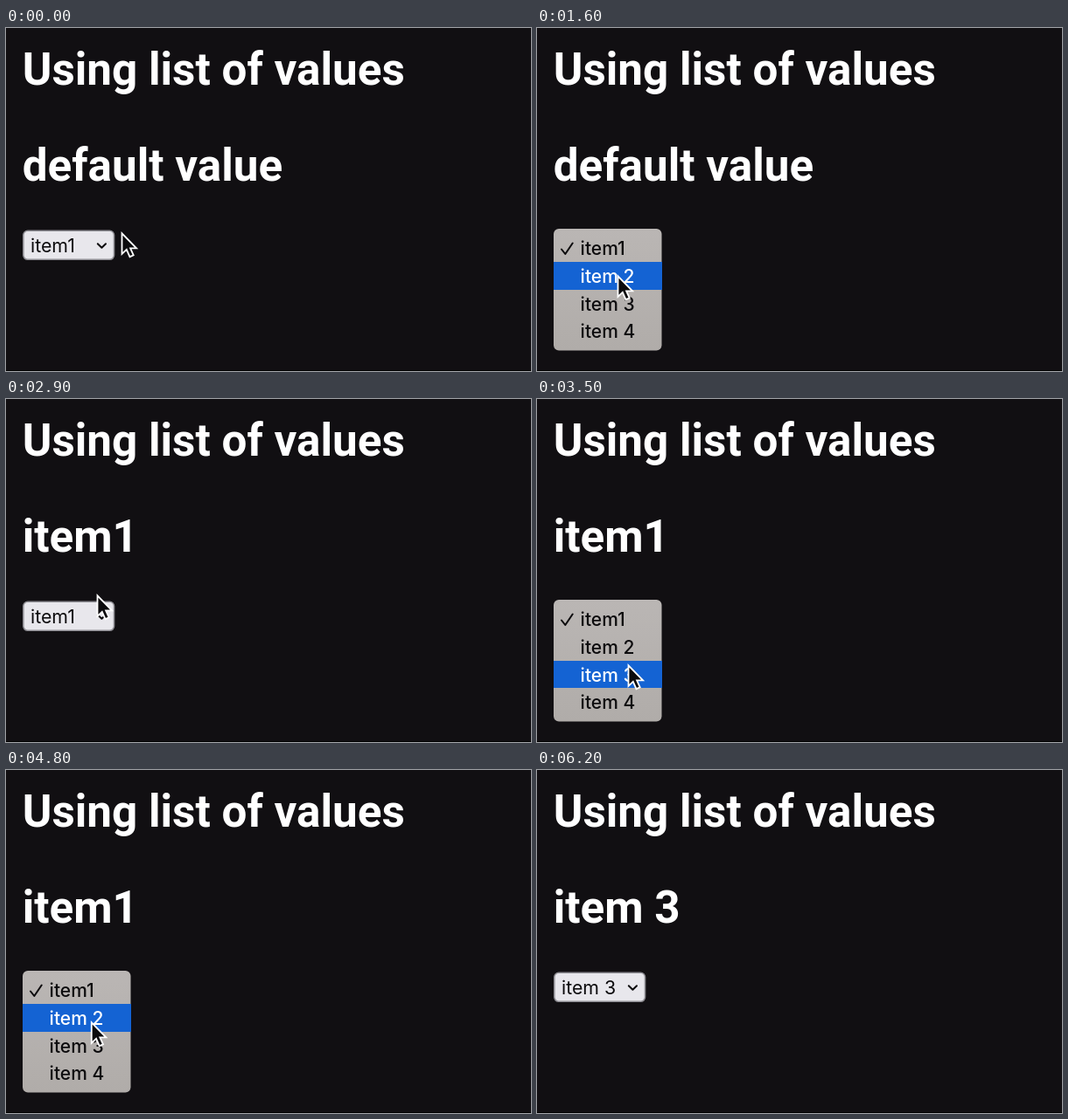
Write an HTML page that moves like this. It is 600x393 px and loops after 6500 ms.

```html
<!DOCTYPE html>
<html lang="en">
<head>
<meta charset="utf-8">
<title>Using list of values</title>
<style>
  html, body { margin: 0; width: 100%; height: 100%; overflow: hidden; background: #110f12; }
  svg { display: block; width: 100vw; height: 100vh; }
  .title { font: 700 51.2px Roboto, sans-serif; fill: #fff; }
  .label { font: 400 21.3px Inter, sans-serif; fill: #0c0b0d; }
  #rows .label { font-weight: 500; font-size: 21px; }
  .stroke { fill: none; stroke: #0c0b0d; stroke-width: 2; stroke-linecap: round; stroke-linejoin: round; }
</style>
</head>
<body>
<svg viewBox="0 0 600 393">
  <defs>
    <linearGradient id="panel" x2="0" y2="1">
      <stop stop-color="#bab6b4"/>
      <stop offset="1" stop-color="#b0aca9"/>
    </linearGradient>
  </defs>
  <rect width="600" height="393" fill="#110f12"/>
  <rect y="392" width="600" height="1" fill="#000"/>
  <text class="title" x="18.7" y="65">Using list of values</text>
  <text class="title" id="heading" x="18.7" y="175"></text>
  <g id="select">
    <rect id="box" x="19.8" y="232.3" width="103.7" height="33" rx="5" stroke="#8d8c92" stroke-width="1.6"/>
    <text class="label" id="value" x="28" y="257"></text>
    <path class="stroke" d="M104.8 247.2l4.6 4.6 4.6-4.6"/>
  </g>
  <g id="menu">
    <rect x="19" y="230" width="123.5" height="139.4" rx="6" fill="url(#panel)"/>
    <rect id="highlight" x="19" width="123.5" fill="#1463d3" shape-rendering="crispEdges"/>
    <g id="rows"></g>
    <path class="stroke" id="check" d="M28 253.5l4.3 5.5 8.4-12.5"/>
  </g>
  <path id="cursor" d="M.5 1.3V24.8L5.8 19.8L9.5 28.2L13.7 26.4L10.1 18.3H17.1Z"
        fill="#0c0b0d" stroke="#fff" stroke-width="1.8"/>
</svg>
<script>
const LOOP = 6500, STEP = 100, POINTER_GONE = 5600;
const ROW = 31.75, ROWS_TOP = 236;
const items = ["item1", "item 2", "item 3", "item 4"];

// Pointer stops; the pointer eases from one to the next.
const stops = [
  { t: 0, x: 132, y: 234 },
  { t: 1000, x: 102, y: 250 },
  { t: 1600, x: 92, y: 283 },
  { t: 2100, x: 103, y: 238 },
  { t: 2900, x: 104, y: 224 },
  { t: 3500, x: 104, y: 304 },
  { t: 4300, x: 96.5, y: 258 },
  { t: 5300, x: 98, y: 318 },
  { t: 5400, x: 135, y: 305 },
  { t: 5500, x: 455, y: 180 }
];

const $ = id => document.getElementById(id);
const show = (el, on) => { el.style.display = on ? "" : "none"; };
const lerp = (a, b, p) => a + (b - a) * p;
const smooth = p => p * p * (3 - 2 * p);

function pointerAt(t) {
  const next = stops.findIndex(stop => stop.t > t);
  if (next < 0) return stops[stops.length - 1];
  const a = stops[next - 1], b = stops[next];
  const p = smooth((t - a.t) / (b.t - a.t));
  return { x: lerp(a.x, b.x, p), y: lerp(a.y, b.y, p) };
}

// The menu opens with the selected row over the closed control.
const menuShift = selected => -ROW * selected;
const rowAt = (y, selected) => Math.floor((y - ROWS_TOP - menuShift(selected)) / ROW);

// Closing a menu picks the row under the pointer.
let current = 0;
const visits = [[1000, 1700], [2100, 2700], [3200, 4100], [4400, 5100]].map(([open, close]) => {
  current = rowAt(pointerAt(close).y, current);
  return { open, close, pick: current };
});

const rows = items.map((text, i) => {
  const row = document.createElementNS("http://www.w3.org/2000/svg", "text");
  row.setAttribute("class", "label");
  row.setAttribute("x", 49.6);
  row.setAttribute("y", ROWS_TOP + ROW * i + 24);
  row.textContent = text;
  return $("rows").appendChild(row);
});
$("highlight").setAttribute("height", ROW);

function drawMenu(selected, y) {
  const hovered = rowAt(y, selected), shift = menuShift(selected);
  $("menu").setAttribute("transform", `translate(0 ${shift})`);
  $("highlight").setAttribute("y", ROWS_TOP + ROW * hovered);
  rows.forEach((row, i) => { row.style.fill = i === hovered ? "#fff" : ""; });
  $("check").setAttribute("transform", `translate(0 ${-shift})`);
  $("check").style.stroke = selected === hovered ? "#fff" : "";
}

function render(time) {
  const t = Math.floor((time % LOOP) / STEP) * STEP;
  const { x, y } = pointerAt(t);
  const done = visits.filter(v => t >= v.close);
  const selected = done.length ? done[done.length - 1].pick : 0;
  const open = visits.some(v => t >= v.open && t < v.close);
  const hover = x > 19 && x < 124 && y > 232 && y < 266;

  $("heading").textContent = done.length ? items[selected] : "default value";
  $("value").textContent = items[selected];
  $("box").setAttribute("fill", hover ? "#c9c8cf" : "#e8e7ec");
  show($("select"), !open);
  show($("menu"), open);
  if (open) drawMenu(selected, y);
  show($("cursor"), t < POINTER_GONE);
  $("cursor").setAttribute("transform", `translate(${x} ${y})`);
}

const start = performance.now();
function tick() {
  render(performance.now() - start);
  requestAnimationFrame(tick);
}
tick();
</script>
</body>
</html>
```
